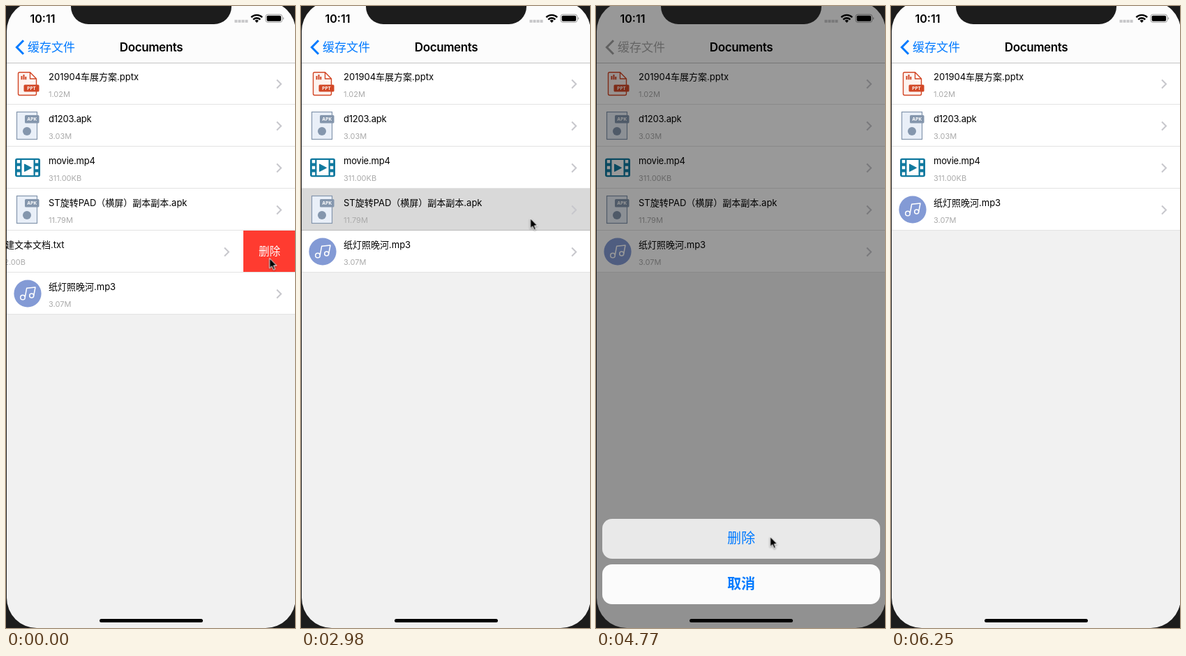
These frames come from a looping animation (414x889 px, 6.97 s). An HTML page:

```html
<!DOCTYPE html>
<html lang="zh-CN">
<head>
<meta charset="utf-8">
<title>Documents</title>
<style>
:root { --t: 0ms; --blue: #007aff; }
html, body { margin: 0; width: 100%; height: 100%; overflow: hidden; background: #1c1c1c; }
.stage {
  position: relative; width: 414px; height: 889px; overflow: hidden; background: #f1f1f1;
  font-family: Inter, "Noto Sans CJK SC", "Noto Sans CJK", sans-serif; color: #000;
}
.stage div, .stage span, .stage svg { position: absolute; box-sizing: border-box; white-space: nowrap; }

/* navigation */
.nav { left: 0; top: 0; width: 414px; height: 82px; background: #fcfcfc; border-bottom: 1px solid #c4c4c4; }
.clock { left: 34.5px; top: 8px; font: 600 16px/20px Inter, sans-serif; }
.title { left: 108px; width: 200px; top: 49px; text-align: center; font-weight: 600; font-size: 17px; line-height: 20px; letter-spacing: -.4px; }
.back {
  left: 31px; top: 49px; font-size: 17px; line-height: 20px; color: var(--blue);
  animation: grey 1.6s linear calc(3300ms - var(--t)) paused;
}
.arrow {
  left: 0; top: 0; color: var(--blue);
  animation: fadeTint .3s linear calc(3278ms - var(--t)) both paused,
             backTint .2s linear calc(4800ms - var(--t)) forwards paused;
}

/* list */
.list { left: 0; top: 81px; width: 414px; }
.list .row { position: relative; width: 414px; height: 60px; background: #fff; border-bottom: 1px solid #e3e3e3; }
.row svg { left: 0; top: 0; }
.name { left: 61px; top: 10px; font-size: 13px; line-height: 20px; }
.latin { letter-spacing: -.2px; }
.size { left: 61px; top: 35px; font-size: 11px; line-height: 20px; color: #aaa; }
.picked {
  animation: highlight .43s linear calc(2980ms - var(--t)) paused,
             slideOut .3s ease-in-out calc(5240ms - var(--t)) forwards paused;
}
.swiped {
  animation: swipe .2s ease-in-out calc(1475ms - var(--t)) forwards paused,
             gone 1ms linear calc(1775ms - var(--t)) forwards paused;
}
.body { inset: 0; animation: settle .44s ease-out calc(0ms - var(--t)) both paused; }
.red { left: 340px; top: 0; width: 800px; height: 59px; background: #ff3b30; color: #fff; }
.red span { left: 22px; top: 20px; font-size: 15.5px; line-height: 20px; font-weight: 500; }
.red::before {
  content: ""; position: absolute; left: -9px; right: 0; top: -1px; height: 1px; background: #ff3b30;
  visibility: hidden; animation: seen .3s linear calc(1475ms - var(--t)) paused;
}
.song {
  animation: rise .3s ease-in-out calc(1475ms - var(--t)) both paused,
             riseAgain .3s ease-in-out calc(5240ms - var(--t)) forwards paused;
}

/* action sheet */
.dim {
  inset: 0; background: #000; opacity: 0;
  animation: dimIn .3s ease-in-out calc(3278ms - var(--t)) both paused,
             dimOut .3s ease-in-out calc(4800ms - var(--t)) forwards paused;
}
.sheet {
  left: 9px; top: 733px; width: 398px; height: 122px;
  animation: sheetIn .3s ease-in-out calc(3278ms - var(--t)) both paused,
             sheetOut .3s ease-in-out calc(4800ms - var(--t)) forwards paused;
}
.button { left: 0; width: 398px; height: 57px; border-radius: 14px; background: #fbfbfb; color: var(--blue); text-align: center; font-size: 20px; line-height: 57px; }
.button.remove { top: 0; animation: press 1ms linear calc(4760ms - var(--t)) forwards paused; }
.button.cancel { top: 65px; font-weight: 600; }

/* device */
.bezel { left: 1px; top: -7px; width: 414px; height: 896px; border-radius: 43px; box-shadow: 0 0 0 60px #1c1c1c; }
.notch { left: 93px; top: -12px; width: 230px; height: 38px; border-radius: 0 0 25px 25px; background: #1c1c1c; }
.home { left: 134px; top: 876px; width: 148px; height: 5px; border-radius: 3px; background: #000; }
.pointer {
  left: 0; top: 0; overflow: visible; filter: drop-shadow(0 1px 1px #0006);
  animation: nudge .44s ease-out calc(0ms - var(--t)) both paused,
             toRow .98s ease-in-out calc(1700ms - var(--t)) forwards paused,
             toSheet .97s ease-in-out calc(3500ms - var(--t)) forwards paused,
             vanish .25s linear calc(6000ms - var(--t)) forwards paused;
}

@keyframes grey { from, to { color: #a6a6a6; } }
@keyframes fadeTint { to { color: #a0a0a0; } }
@keyframes backTint { from { color: #a0a0a0; } to { color: var(--blue); } }
@keyframes highlight { from, to { background: #d9d9d9; border-color: #bcbcbc; } }
@keyframes slideOut { to { transform: translateX(-414px); } }
@keyframes swipe { to { transform: translateX(-340px); } }
@keyframes gone { from, to { visibility: hidden; } }
@keyframes seen { from, to { visibility: visible; } }
@keyframes settle { from { transform: translateX(-75px); } to { transform: translateX(-74px); } }
@keyframes rise { from { transform: none; } to { transform: translateY(-60px); } }
@keyframes riseAgain { from { transform: translateY(-60px); } to { transform: translateY(-120px); } }
@keyframes dimIn { from { opacity: 0; } to { opacity: .4; } }
@keyframes dimOut { from { opacity: .4; } to { opacity: 0; } }
@keyframes sheetIn { from { transform: translateY(156px); } to { transform: none; } }
@keyframes sheetOut { from { transform: none; } to { transform: translateY(156px); } }
@keyframes press { from, to { background: #e9e9e9; } }
@keyframes nudge { from { transform: translate(377.5px, 360.5px); } to { transform: translate(379.5px, 360px); } }
@keyframes toRow { from { transform: translate(379.5px, 360px); } to { transform: translate(328.5px, 303.5px); } }
@keyframes toSheet { from { transform: translate(328.5px, 303.5px); } to { transform: translate(249.5px, 758.5px); } }
@keyframes vanish { from { opacity: 1; } to { opacity: 0; } }
</style>
</head>
<body>
<svg width="0" height="0" style="position:absolute">
  <symbol id="more" viewBox="0 0 414 60">
    <path d="M388 24.5l6 6-6 6" fill="none" stroke="#c7c7cc" stroke-width="2"/>
  </symbol>
  <symbol id="apk" viewBox="0 0 414 60">
    <rect x="15.5" y="10.5" width="29" height="39" fill="#e9eff8" stroke="#8496ad" stroke-width="1.2"/>
    <rect x="27" y="15" width="20.5" height="11.5" rx="1.5" fill="#8496ad"/>
    <text x="37.2" y="23.1" font-size="6.5" font-weight="700" text-anchor="middle" fill="#fff">APK</text>
    <circle cx="30" cy="38" r="6" fill="#8496ad"/>
  </symbol>
</svg>

<div class="stage">
  <div class="list">
    <div class="row">
      <svg width="414" height="60">
        <path d="M19.5 13.7H34.5L43.5 23V44.5Q43.5 46.5 41.5 46.5H19.5Q17.5 46.5 17.5 44.5V15.7Q17.5 13.7 19.5 13.7ZM34.5 13.7V23H43.5" fill="#fdf3f0" stroke="#d24726" stroke-width="1.4" stroke-linejoin="round"/>
        <path d="M22.5 24.3V19M25.5 24.3V17M28.3 24.3V20" stroke="#d24726" stroke-width="2"/>
        <rect x="25.5" y="31.5" width="22" height="10" rx="1.5" fill="#d24726"/>
        <text x="36.5" y="38.9" font-size="6.3" font-weight="700" text-anchor="middle" fill="#fff">PPT</text>
        <use href="#more"/>
      </svg>
      <span class="name">201904车展方案.pptx</span><span class="size">1.02M</span>
    </div>
    <div class="row">
      <svg width="414" height="60"><use href="#apk"/><use href="#more"/></svg>
      <span class="name latin">d1203.apk</span><span class="size">3.03M</span>
    </div>
    <div class="row">
      <svg width="414" height="60">
        <rect x="13" y="16.7" width="36" height="26.6" rx="3" fill="#10799f"/>
        <rect x="22.5" y="19" width="17" height="22" fill="#fff"/>
        <path d="M18 19v22M44 19v22" stroke="#fff" stroke-width="4.4" stroke-dasharray="4.6 4.1"/>
        <path d="M26.5 25v10.5l10-5.2z" fill="#10799f" stroke="#10799f" stroke-linejoin="round"/>
        <use href="#more"/>
      </svg>
      <span class="name latin">movie.mp4</span><span class="size">311.00KB</span>
    </div>
    <div class="row picked">
      <svg width="414" height="60"><use href="#apk"/><use href="#more"/></svg>
      <span class="name">ST旋转PAD（横屏）副本副本.apk</span><span class="size">11.79M</span>
    </div>
    <div class="row swiped">
      <div class="body">
        <svg width="414" height="60"><use href="#more"/></svg>
        <span class="name">新建文本文档.txt</span><span class="size">132.00B</span>
      </div>
      <div class="red"><span>删除</span></div>
    </div>
    <div class="row song">
      <svg width="414" height="60">
        <circle cx="31" cy="30" r="19.6" fill="#839ad5"/>
        <g fill="none" stroke="#fff" stroke-width="1.5" stroke-linejoin="round">
          <circle cx="24" cy="35.5" r="3.3"/><circle cx="36.7" cy="33" r="3"/>
          <path d="M27.2 35.5L29.7 22.2L42 21L39.7 33"/>
        </g>
        <use href="#more"/>
      </svg>
      <span class="name">纸灯照晚河.mp3</span><span class="size">3.07M</span>
    </div>
  </div>

  <div class="nav">
    <span class="clock">10:11</span>
    <svg width="414" height="40" style="left:0;top:0">
      <path d="M327.5 21.7h19" stroke="#c6c6c8" stroke-width="4" stroke-dasharray="4 1"/>
      <g fill="none" stroke="#000" stroke-width="2.4">
        <path d="M351.3 16.2a11 11 0 0 1 15.8 0M354.2 19.3a7 7 0 0 1 10 0"/>
      </g>
      <path d="M359.2 24l-2.7-2.9a4 4 0 0 1 5.4 0z"/>
      <rect x="372" y="12.1" width="23.6" height="11.2" rx="3" fill="none" stroke="#9b9b9b"/>
      <rect x="373.6" y="13.7" width="20.4" height="8" rx="1.6"/>
      <path d="M396.8 15.8v4q1.4-.6 1.4-2t-1.4-2z" fill="#9b9b9b"/>
    </svg>
    <svg class="arrow" width="40" height="80">
      <path d="M25 49.2L15.4 59L25 68.8" fill="none" stroke="currentColor" stroke-width="3"/>
    </svg>
    <span class="back">缓存文件</span>
    <span class="title">Documents</span>
  </div>

  <div class="dim"></div>
  <div class="sheet">
    <div class="button remove">删除</div>
    <div class="button cancel">取消</div>
  </div>
  <div class="bezel"></div>
  <div class="notch"></div>
  <div class="home"></div>
  <svg class="pointer" width="12" height="18">
    <path d="M0 0V14.4L3.3 11.4L5.7 16.6L8 15.6L5.8 10.5H10.2Z" stroke="#fff"/>
  </svg>
</div>

<script>
// The screen refreshes only at these moments; CSS describes the motion in between.
const LOOP = 6970;
const ticks = [
  0, 140, 290, 440,
  1640, 1790, 1940, 2090, 2230, 2380, 2530, 2680, 2980,
  3420, 3570, 3720, 3870, 4020, 4170, 4320, 4470,
  4770, 4910, 5060, 5360, 5510, 5650, 6100, 6250
];
const start = performance.now();
let shown = -1;

function draw() {
  const ms = (performance.now() - start) % LOOP;
  const tick = ticks.filter(m => m <= ms).pop();
  if (tick !== shown) {
    shown = tick;
    document.documentElement.style.setProperty('--t', tick + 'ms');
  }
  requestAnimationFrame(draw);
}
draw();
</script>
</body>
</html>
```
